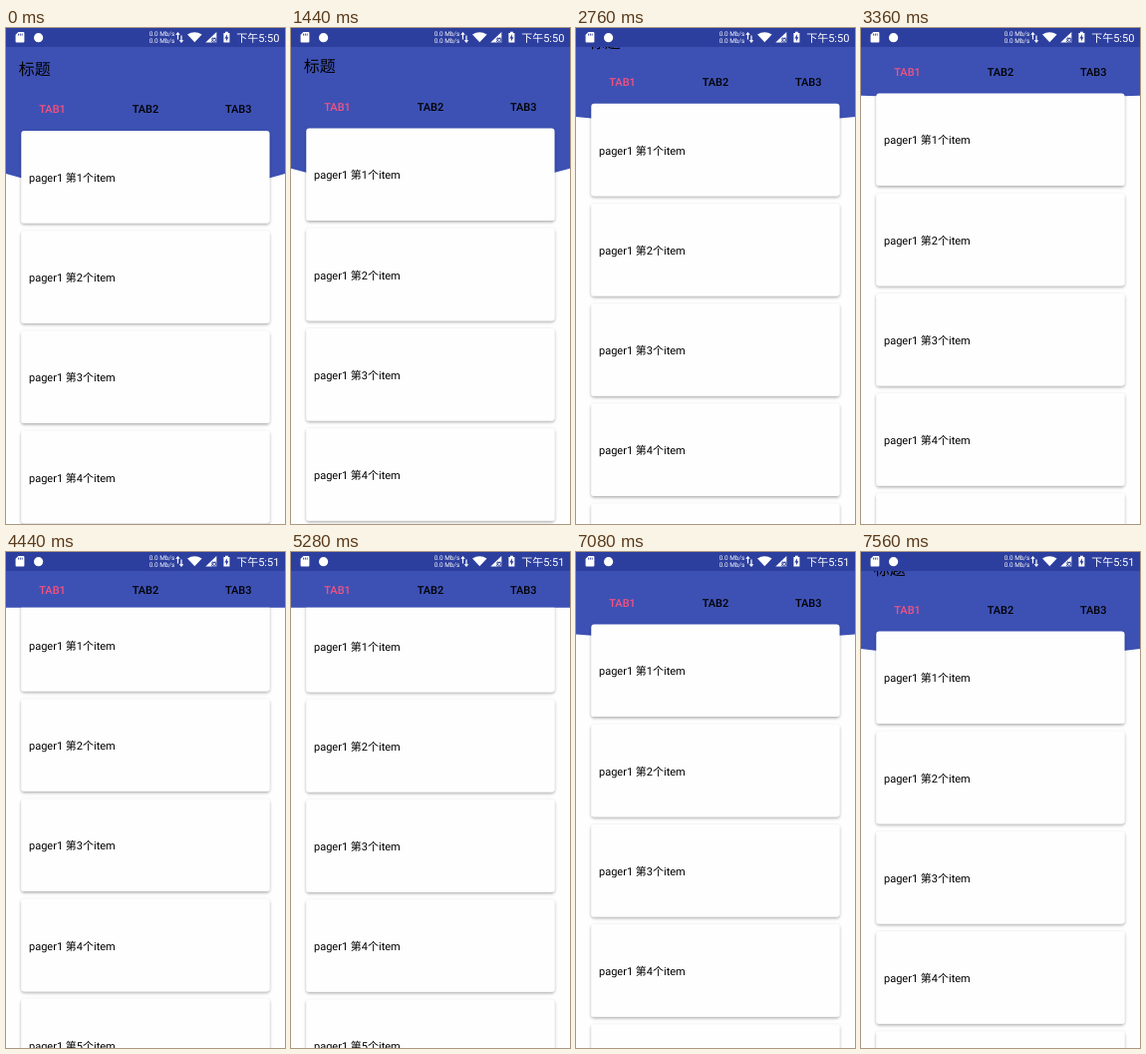
An HTML page for the animation above (7.68 s loop, 280 by 497 pixels).

```html
<!DOCTYPE html>
<html lang="zh-CN">
<head>
<meta charset="utf-8">
<title>标题</title>
<style>
  html, body { margin: 0; width: 100%; height: 100%; overflow: hidden; background: #fff; }
  svg { display: block; width: 100%; height: 100%; }
  text { font-family: Roboto, "Noto Sans CJK SC", "Noto Sans CJK", sans-serif; font-size: 11px; white-space: pre; text-rendering: geometricPrecision; }
  .title { font-size: 16px; }
  .tab { font-weight: 500; text-anchor: middle; }
  .on { fill: #f4527f; }
  .speed { font-size: 6.4px; }
</style>
</head>
<body>
<svg viewBox="0 0 280 497" xmlns="http://www.w3.org/2000/svg">
  <defs>
    <filter id="shadow" x="-5%" y="-10%" width="110%" height="125%">
      <feDropShadow dx="0" dy="1.4" stdDeviation="1.5" flood-color="#000" flood-opacity=".34"/>
    </filter>
    <clipPath id="view"><rect id="viewRect" width="280" height="497"/></clipPath>
  </defs>
  <rect width="280" height="497" fill="#fdfefd"/>
  <path id="arc" fill="#3d51b4"/>
  <g id="bar">
    <text class="title" x="12.7" y="46.8">标题</text>
    <text class="tab on" x="46.6" y="85">TAB1</text>
    <text class="tab" x="140" y="85">TAB2</text>
    <text class="tab" x="233.3" y="85">TAB3</text>
  </g>
  <g clip-path="url(#view)"><g id="list"></g></g>
  <g fill="#fff">
    <rect width="280" height="19" fill="#2d3f9e"/>
    <path d="M12.4 4h5a1 1 0 0 1 1 1v8.4a1 1 0 0 1-1 1h-6.8a1 1 0 0 1-1-1V6.8z"/>
    <path d="M12.6 5.6v2M14.4 5.6v2M16.2 5.6v2" stroke="#2d3f9e" stroke-width=".9"/>
    <circle cx="32.6" cy="9.7" r="4.6"/>
    <text class="speed" x="143.7" y="7.8">0.0 Mb/s</text>
    <text class="speed" x="143.7" y="15.4">0.0 Mb/s</text>
    <path d="M172.5 4l2.3 2.8h-1.7v4.6h-1.2V6.8h-1.7zM176 15l-2.3-2.8h1.7V7.6h1.2v4.6h1.7z"/>
    <path d="M189.3 14.2L182 6.6Q189.3 1.8 196.600 6.600z"/>
    <path d="M211.300 4v10.400h-11z"/>
    <path d="M206.800 10.200l4 4m0-4l-4 4" stroke="#2d3f9e" stroke-width="2.600"/>
    <path d="M207.200 10.600l3.400 3.400m0-3.400l-3.400 3.400" stroke="#fff" stroke-width="1"/>
    <path d="M220 3.700h2.800v1.200h1.600v9.700h-6V4.900h1.600z"/>
    <path d="M221.900 6.300v2.900h1.500l-2.500 4.200v-3h-1.500z" fill="#2d3f9e"/>
    <text id="clock" x="231.200" y="13.500"></text>
  </g>
</svg>
<script>
const LOOP = 7680, STEP = 120, CLOCK_TICK = 4200;
const COLLAPSE = 43.3, PITCH = 100.2;
// [time in ms, scroll distance in px]
const drag = [[0, 0], [1320, 0], [2040, 15], [3360, 37.5], [4440, 56], [4800, 61],
              [4920, 61], [6000, 44], [7080, 30.5], [7560, 23.5], [LOOP, 23.5]];
const $ = id => document.getElementById(id);

function scrollAt(t) {
  const i = drag.findIndex(([time]) => time > t);
  const [t0, s0] = drag[i - 1], [t1, s1] = drag[i];
  return s0 + (s1 - s0) * (t - t0) / (t1 - t0);
}

function card(n) {
  const y = 103 + n * PITCH;
  return `<rect x="15.3" y="${y}" width="249.2" height="92.6" rx="3" fill="#fdfefd" filter="url(#shadow)"/>
    <text x="23" y="${y + 50.9}">pager1 第${n + 1}个item</text>`;
}

function draw(time) {
  const t = Math.floor(time % LOOP / STEP) * STEP;
  const scroll = scrollAt(t);
  const shift = Math.min(scroll, COLLAPSE);
  const open = 1 - shift / COLLAPSE;
  const edge = 55.7 + 90.3 * open;
  $('arc').setAttribute('d', `M0 0H280V${edge}Q140 ${edge + 42 * open} 0 ${edge}z`);
  $('bar').setAttribute('transform', `translate(0 ${-shift})`);
  $('viewRect').setAttribute('y', 99 - shift);
  $('list').setAttribute('transform', `translate(0 ${-scroll})`);
  $('clock').textContent = t < CLOCK_TICK ? '下午5:50' : '下午5:51';
}

$('list').innerHTML = [0, 1, 2, 3, 4].map(card).join('');
const start = performance.now();
function tick() {
  draw(performance.now() - start);
  requestAnimationFrame(tick);
}
tick();
</script>
</body>
</html>
```
